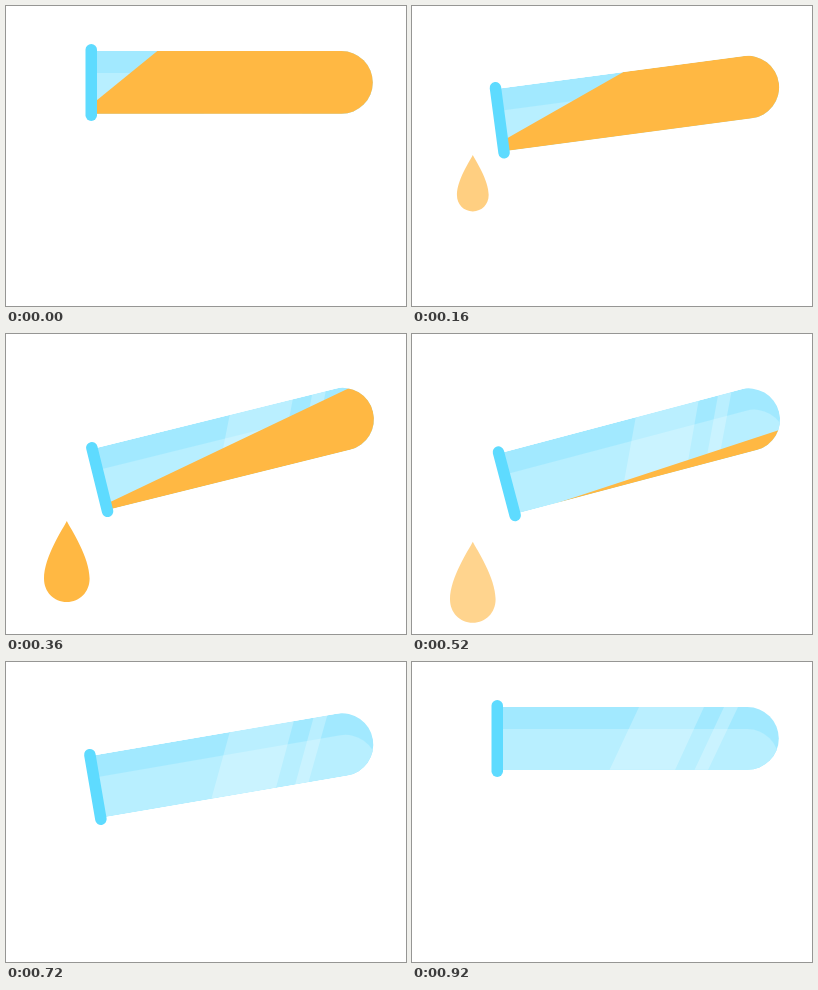
Animation of 400x300 px, one loop 1000 ms. Source, as an HTML page:

```html
<!DOCTYPE html>
<html lang="en">
<head>
<meta charset="utf-8">
<title>Pouring test tube</title>
<style>
  html, body { margin: 0; width: 100%; height: 100%; overflow: hidden; background: #fff; }
  svg { display: block; width: 100vw; height: 100vh; }
</style>
</head>
<body>
<svg viewBox="0 0 400 300">
  <defs>
    <clipPath id="glass">
      <path d="M85 45H335.4A31.4 31.4 0 0 1 335.4 107.8H85Z"/>
    </clipPath>
  </defs>
  <path id="drop" fill="#ffb843"
    d="M0 0C4 8 22.8 36 22.8 57.5C22.8 71 13 81 0 81C-13 81 -22.8 71 -22.8 57.5C-22.8 36 -4 8 0 0Z"/>
  <g id="tube">
    <g clip-path="url(#glass)">
      <rect x="85" y="45" width="285" height="63" fill="#a2e9ff"/>
      <path d="M85 67H335.4A31.4 31.4 0 0 1 366.8 98.4V108H85Z" fill="#b8efff"/>
      <path d="M227 45H292L263 108H197.5ZM312 45H326L296 108H282.5Z" fill="#fff" opacity=".25"/>
      <path id="liquid" fill="#ffb843"/>
    </g>
    <rect x="79.5" y="38" width="11.5" height="77" rx="5.75" fill="#5edbff"/>
  </g>
</svg>
<script>
const LOOP = 1000, STEP = 40;
const PEAK = 475, END = 920, TILT = 15;
const tube = document.getElementById('tube');
const liquid = document.getElementById('liquid');
const drop = document.getElementById('drop');

const clamp = v => Math.min(1, Math.max(0, v));
const easeOut = p => Math.sin(clamp(p) * Math.PI / 2);

// Tips down with an ease-out, then swings back
function tilt(t) {
  return TILT * (t < PEAK ? easeOut(t / PEAK) : 1 - clamp(1 - easeOut((END - t) / (END - PEAK))));
}

// The surface flattens against the glass while its level at the lip sinks
function drawLiquid(t) {
  const angle = 29.9 - 0.051 * t + 9.3 * Math.exp(-t / 50);
  const depth = 49.2 + 16 * (t / 520) ** 2.5;
  const slope = Math.tan(angle * Math.PI / 180);
  const surface = x => 45 + depth - slope * (x - 91);
  liquid.setAttribute('d', `M85 ${surface(85)}L370 ${surface(370)}V400H85Z`);
}

function drawDrop(t) {
  const y = 113.5 + 104 * easeOut(t / 720);
  drop.setAttribute('transform', `translate(60.8 ${y}) scale(${clamp(t / 230)})`);
  drop.setAttribute('opacity', Math.min(clamp(t / 240), clamp((640 - t) / 200)));
}

function draw(t) {
  tube.setAttribute('transform', `rotate(${-tilt(t)} 372 76.4)`);
  drawLiquid(t);
  drawDrop(t);
}

function tick() {
  const t = performance.now() % LOOP;
  draw(Math.floor(t / STEP) * STEP);
  requestAnimationFrame(tick);
}
draw(0);
requestAnimationFrame(tick);
</script>
</body>
</html>
```
